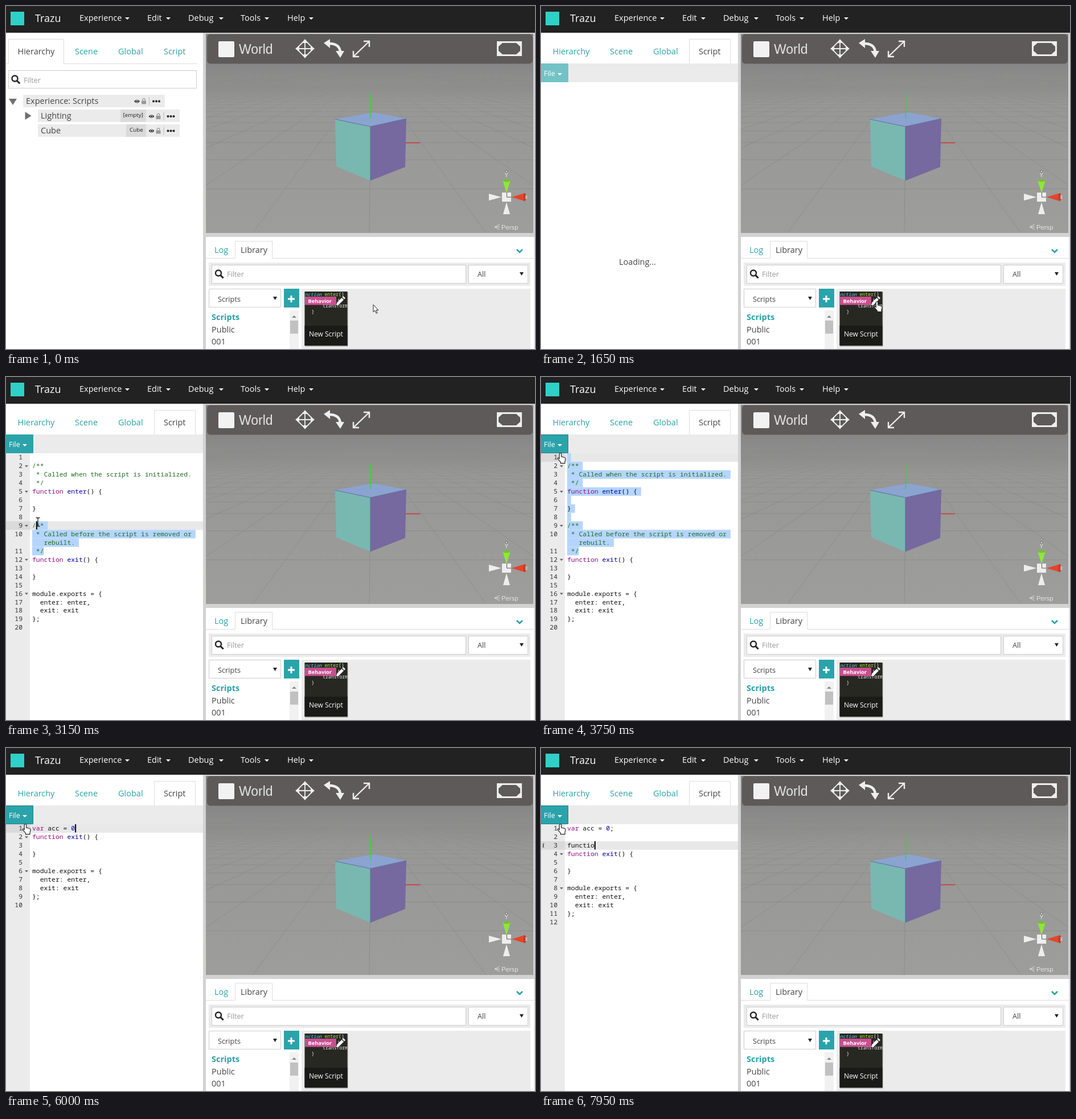
An HTML page that plays this animation: 929 px wide and 603 px high, repeating every 8000 ms.

```html
<!DOCTYPE html>
<html lang="en">
<head>
<meta charset="utf-8">
<title>Script editor</title>
<style>
  html, body { margin: 0; width: 100%; height: 100%; overflow: hidden; background: #fff; }
  svg { display: block; }
  text { font: 14.5px "Open Sans", sans-serif; fill: #444; white-space: pre; }
  .white { fill: #fff; }
  .link { fill: #2aa0a6; }
  .hint { font-size: 12.8px; fill: #999; }
  .small { font-size: 9.8px; fill: #222; }
  .unity { font-family: "Liberation Sans", Arial, sans-serif; fill: #e4e4e4; }
  .box { fill: #fff; stroke: #ccc; }
  .line { fill: none; stroke: #ddd; }
  .code text { font: 11.38px "Noto Sans Mono", monospace; fill: #111; }
  .code .num { text-anchor: end; fill: #333; }
  .code .info { font: italic bold 11px "Noto Serif", serif; fill: #555; }
  .code .loading { font: 14.4px "Open Sans", sans-serif; fill: #444; }
  .code .comment { fill: #236e24; }
  .thumb text { font: 8.2px "Noto Sans Mono", monospace; fill: #eee; }
  .thumb .badge { font: bold 9.3px "Open Sans", sans-serif; fill: #fff; }
  .thumb .name { font: 12px "Open Sans", sans-serif; fill: #fff; }
  .kw { fill: #930f80; }
  .fn { fill: #0000a2; }
  .lit { fill: #0000cd; }
</style>
</head>
<body>
<svg width="929" height="603" viewBox="0 0 929 603">
  <defs>
    <path id="drop" d="M0 0h8l-4 4z" fill="#fff"/>
    <path id="select" d="M0 0h7l-3.5 6z" fill="#222"/>
    <g id="lens" fill="none" stroke="#222" stroke-width="2.4"><circle r="5"/><path d="M3.7 3.7l5 5" stroke-width="3"/></g>
    <g id="tools">
      <path d="M-5 0Q0-6 5 0Q0 6-5 0z" fill="#222"/><circle r="2.4" fill="#eee"/><circle r="1.5" fill="#222"/>
      <path d="M8-1h8v6h-8z" fill="#999"/><path d="M9.8-1v-1.6a2.2 2.2 0 0 1 4.4 0v1.6" fill="none" stroke="#999" stroke-width="1.3"/>
      <path d="M21.5-7v14" stroke="#bbb"/>
      <g fill="#222"><circle cx="29" r="2"/><circle cx="34" r="2"/><circle cx="39" r="2"/></g>
    </g>
    <path id="arrow" d="M0 0v13l3-2.7 2.2 5 2-.9-2.2-4.8h4z" fill="#fff" stroke="#222"/>
    <path id="hand" d="M-1.8 1.5a1.7 1.7 0 0 1 3.5 0v4.6l6 1.4q1.7.6 1.4 2.8l-1.1 4v3.4h-7.5v-2l-5-5.7q-.8-2 1.2-2l1.5 1.4z" fill="#fff" stroke="#222" stroke-width="1.2"/>
    <path id="beam" d="M-3.5-7.5h2.5l1 1 1-1h2.5M0-6.5v13M-3.5 7.5h2.5l1-1 1 1h2.5" fill="none" stroke="#222" stroke-width="1.3"/>
    <linearGradient id="floor" x2="0" y2="1">
      <stop offset=".14" stop-color="#858585"/><stop offset=".35" stop-color="#979796"/><stop offset="1" stop-color="#9d9d9b"/>
    </linearGradient>
    <linearGradient id="fade" gradientUnits="userSpaceOnUse" x1="0" y1="118" x2="0" y2="230">
      <stop offset="0" stop-color="#777" stop-opacity="0"/><stop offset="1" stop-color="#777" stop-opacity=".4"/>
    </linearGradient>
    <clipPath id="view"><path d="M351 49h575v350H351z"/></clipPath>
    <clipPath id="card"><path d="M524.5 502h75v95h-75z"/></clipPath>
  </defs>

  <!-- menu bar -->
  <path d="M0 0h929v47H0z" fill="#222"/>
  <path d="M8 10h24v24H8z" fill="#2fd0c8"/>
  <text class="white" x="51" y="28" style="font-size:18px">Trazu</text>
  <g id="menu"></g>

  <!-- frame -->
  <path d="M346 47h583v359H346zM346 406h5v197h-5z" fill="#d2d2d2"/>

  <!-- viewport -->
  <g clip-path="url(#view)">
    <path d="M351 48h575v351H351z" fill="url(#floor)"/>
    <path id="grid" fill="none" stroke="url(#fade)"/>
    <rect x="353" y="49.5" width="572" height="52" rx="6" fill="#5e5a5a"/>
    <path d="M578 199l67-12 58 11-63 14z" fill="#8ba3d0"/>
    <path d="M578 199l62 13v95l-60-25z" fill="#79b8b0"/>
    <path d="M703 198l-63 14v95l61-24z" fill="#75699f"/>
    <path d="M578 199l62 13 63-14M640 212v95" fill="none" stroke="#66709f" stroke-width="1.2"/>
    <path d="M640.5 153v44" stroke="#35d535" stroke-width="1.6"/>
    <path d="M702 240.5h25" stroke="#c83a3a" stroke-width="1.6"/>
  </g>
  <rect x="373" y="62" width="28" height="28" rx="2" fill="#f2f2f2"/>
  <text class="unity" x="409" y="84" style="font-size:23px">World</text>
  <g fill="none" stroke="#eee" stroke-width="1.8">
    <path d="M525 60l15 15-15 15-15-15zM525 62v26M512 75h26"/>
    <path d="M567 66q19 0 20 15" stroke-width="4.5"/>
    <path d="M611 88l26-25M610 79v10h10M628 62h10v10" stroke-width="2.4"/>
    <path d="M863.5 63.5h41v23h-41z" stroke-width="3"/>
  </g>
  <path d="M525 58l5 7h-10zM525 92l5-7h-10zM508 75l7-5v10zM542 75l-7-5v10zM558 65l11-7v16zM579 79h15l-7 12zM864 64h9l-9 8zM904 64h-9l9 8zM864 86h9l-9-8zM904 86h-9l9-8z" fill="#eee"/>

  <!-- axis gizmo -->
  <path d="M848 330v12l22-6zM873 366h12l-6-21zM871 328h16v16h-16z" fill="#eee"/>
  <path d="M872 306h14l-7 23z" fill="#8fe63a"/><ellipse cx="879" cy="307" rx="7" ry="2" fill="#6fc52a"/>
  <path d="M888 336l23-7v14z" fill="#e8432a"/><ellipse cx="911" cy="336" rx="2" ry="7" fill="#b93624"/>
  <path d="M879.5 328v8h8" fill="none" stroke="#555"/>
  <circle cx="879" cy="291" r="2" fill="#ddd" stroke="#666"/>
  <text class="unity" x="875.5" y="301" style="font-size:10px">Y</text>
  <text class="unity" x="911" y="339" style="font-size:10px">x</text>
  <path d="M867 384l-9 4.5 9 4.5M858 388.5h9" fill="none" stroke="#ddd"/>
  <text class="unity" x="870" y="393" style="font-size:11.3px">Persp</text>

  <!-- library -->
  <path d="M351 406h576v197H351z" fill="#fff"/>
  <path d="M927 406h2v197h-2z" fill="#e6e6e6"/>
  <path class="line" d="M351 443.5h51.5v-30h65v30H927"/>
  <text class="link" x="366" y="434">Log</text>
  <text x="412" y="434">Library</text>
  <path d="M897 428l5 5 5-5" fill="none" stroke="#2aa0a6" stroke-width="2.6"/>
  <path d="M356 451h565v41H356zM519 497h402v106H519z" fill="#ebebeb"/>
  <path class="box" d="M361.5 455.5h446v32h-446zM812.5 455.5h104v32h-104zM356.5 497.5h126v32h-126z"/>
  <use href="#lens" x="373" y="469.5"/>
  <text class="hint" x="388" y="476">Filter</text>
  <text class="hint" x="828" y="476" style="fill:#444">All</text>
  <text class="hint" x="372" y="520" style="fill:#444">Scripts</text>
  <use href="#select" x="902" y="468"/><use href="#select" x="469" y="511"/>
  <path d="M488 497h27v33h-27z" fill="#2ba3ab"/>
  <path d="M495 515h12M501 509v12" stroke="#fff" stroke-width="3"/>
  <text class="link" x="361" y="552" style="font-weight:bold">Scripts</text>
  <text x="361" y="574">Public</text>
  <text x="361" y="595">001</text>
  <path d="M498 535h16v68h-16z" fill="#f1f1f1"/>
  <path d="M499 553h14v23h-14z" fill="#c1c1c1"/><path d="M502 548h8l-4-4z" fill="#888"/>
  <path d="M525 503h75.5v95.5H525z" fill="#999"/>
  <g class="thumb" clip-path="url(#card)">
    <path d="M524 502h76v95h-76z" fill="#272822"/>
    <text x="525" y="510"><tspan font-style="italic" fill="#66d9ef">nction</tspan> <tspan fill="#a6e22e">enter</tspan>()</text>
    <text x="582" y="521">i</text>
    <text x="556" y="530">transform</text>
    <text x="536.5" y="541">}</text>
    <path d="M525 511h55v14.5h-55z" fill="#c94f90"/>
    <text class="badge" x="530.5" y="522">Behavior</text>
    <path d="M524 562h76v35h-76z" fill="#1a1b17"/>
    <text class="name" x="532" y="581">New Script</text>
    <path d="M580 526l1.5-5 8-8 3.5 3.5-8 8zM590.5 512l2-2 3.5 3.5-2 2z" fill="#fff"/>
  </g>

  <!-- left panel -->
  <text class="link" x="121" y="85">Scene</text>
  <text class="link" x="197" y="85">Global</text>
  <g id="tree">
    <path class="line" d="M0 101.5h4.5v-43h97v43H335"/>
    <text x="20.5" y="85">Hierarchy</text>
    <text class="link" x="277" y="85">Script</text>
    <path class="box" d="M4.5 113.5h330v31H4.5z"/>
    <use href="#lens" x="15.5" y="127.5"/>
    <text class="hint" x="31" y="135">Filter</text>
    <path d="M30 156h249v22H30zM56 182h249v22H56zM56 208h249v22H56z" fill="#ebebeb"/>
    <path d="M201 182h45v22h-45zM211 208h35v22h-35z" fill="#dadada"/>
    <path d="M5 163h14l-7 11zM33.5 186v14l11-7z" fill="#707070"/>
    <text x="35" y="172">Experience: Scripts</text>
    <text x="61" y="198">Lighting</text>
    <text x="61" y="223.5">Cube</text>
    <text class="small" x="205.5" y="195">[empty]</text>
    <text class="small" x="217" y="221">Cube</text>
    <use href="#tools" x="230" y="167.5"/><use href="#tools" x="255.5" y="194"/><use href="#tools" x="255.5" y="219.5"/>
  </g>
  <g id="editor">
    <path class="line" d="M260.5 101.5v-43h72v43"/>
    <text class="link" x="20.5" y="85">Hierarchy</text>
    <text x="277" y="85">Script</text>
    <path d="M0 101h346v33H0z" fill="#ebebeb"/>
    <path id="file" d="M-.5 101.5h48v32h-48z"/>
    <text class="white" x="5" y="123" style="font-size:12.5px">File</text>
    <use href="#drop" x="29" y="118"/>
    <g id="code" class="code"></g>
  </g>
  <use id="cursor"/>
</svg>
<script>
const $ = id => document.getElementById(id);
const LOOP = 8000, TOP = 134, LEFT = 46, ROW = 14.96, CHAR = 6.83;

const INTRO = `
/**
 * Called when the script is initialized.
 */
function enter() {

}

/**
 * Called before the script is removed or
   rebuilt.
 */`;
const REST = `
function exit() {

}

module.exports = {
  enter: enter,
  exit: exit
};
`;

// Each step holds until the next one: [time, ...values]
const pointer = [
  [0, 'arrow', 645, 525], [600, 'arrow', 634, 526], [750, 'arrow', 613, 527], [900, 'arrow', 597, 524],
  [1050, 'hand', 590, 520], [2100, 'arrow', 535, 500], [2250, 'arrow', 400, 432], [2400, 'beam', 240, 355],
  [2550, 'beam', 153, 318], [2700, 'beam', 100, 309], [2850, 'beam', 70, 307], [3000, 'beam', 66, 306],
  [3150, 'beam', 56, 255], [3300, 'beam', 46, 186], [3450, 'hand', 34, 134]
];
const carets = [[0, 0, 0], [3000, 11, 3], [3150, 8, 1], [3300, 3, 0], [3450, 0, 0]];
const typing = [
  [4050, ''], [4350, 'v'], [4500, 'var'], [4950, 'var a'], [5250, 'var ac'], [5400, 'var acc'],
  [5550, 'var acc ='], [5700, 'var acc = '], [6000, 'var acc = 0'], [6300, 'var acc = 0;'],
  [6450, 'var acc = 0;\n'], [7050, 'var acc = 0;\n\n'], [7350, 'var acc = 0;\n\nf'],
  [7500, 'var acc = 0;\n\nfu'], [7650, 'var acc = 0;\n\nfunc'], [7800, 'var acc = 0;\n\nfunct'],
  [7950, 'var acc = 0;\n\nfunctio']
];
// Gutter marks: [from, to, kind, row]
const marks = [[4500, 4950, 'info', 0], [4950, 5700, 'error', 1], [6300, 6450, 'info', 0], [7650, LOOP, 'info', 2]];

const at = (steps, t) => steps.findLast(step => step[0] <= t);
const rowY = row => TOP + row * ROW;
const rect = (x, y, w, h, fill) => `<rect x="${x}" y="${y}" width="${w}" height="${h}" fill="${fill}"/>`;

function highlight(line) {
  if (/^(\/\*| \*|   r)/.test(line)) return `<tspan class="comment">${line}</tspan>`;
  return line.replace(/\b(\d+|function|var|enter(?=\()|exit(?=\())\b/g, word => {
    const kind = /\d/.test(word) ? 'lit' : /^e/.test(word) ? 'fn' : 'kw';
    return `<tspan class="${kind}">${word}</tspan>`;
  });
}

function drawMark([, , kind, row]) {
  const y = rowY(row);
  if (kind === 'info') return `<text class="info" x="2" y="${y + 11.5}">i</text>`;
  return `<rect x="-1" y="${y + 1.5}" width="12" height="11.5" rx="2" fill="#c9523f"/>` +
    `<path d="M2 ${y + 4}l6.5 6.5m0-6.5l-6.5 6.5" stroke="#fff" stroke-width="1.8"/>`;
}

function drawCode(t) {
  const typed = at(typing, t)?.[1];
  const editing = typed !== undefined;
  const lines = ((editing ? typed : INTRO) + REST).split('\n');
  let [, row, col] = at(carets, t);
  if (editing) {
    const before = typed.split('\n');
    row = before.length - 1;
    col = before[row].length;
  }

  let out = rect(0, TOP, 42, 469, '#ebebeb') + rect(0, rowY(row), 42, ROW, '#dadada') +
    rect(42, rowY(row), 304, ROW, '#e8e8e8');
  if (t >= 3150 && !editing) {
    for (let r = row; r <= 11; r++) {
      const from = r === row ? col : 0;
      const to = r === 11 ? 3 : lines[r].length + 1;
      out += rect(LEFT + from * CHAR, rowY(r), (to - from) * CHAR, ROW, '#b5d5ff');
    }
  }

  let number = 0;
  lines.forEach((line, r) => {
    const y = rowY(r) + 11.2;
    out += `<text x="${LEFT}" y="${y}">${highlight(line)}</text>`;
    if (!line.startsWith('   r')) out += `<text class="num" x="29" y="${y}">${++number}</text>`;
    if (/^\/\*\*|\{$/.test(line)) out += `<path d="M33 ${y - 5}h6l-3 3.5z" fill="#666"/>`;
  });

  out += marks.filter(([from, to]) => from <= t && t < to).map(drawMark).join('');
  const focused = t >= 3000;
  if (t < 3750 || editing)
    out += rect(LEFT + col * CHAR, rowY(row), focused ? 2 : 1, ROW - .5, focused ? '#000' : '#999');
  return out;
}

function draw(t) {
  const loading = t < 1800;
  $('tree').style.display = t < 1500 ? '' : 'none';
  $('editor').style.display = t < 1500 ? 'none' : '';
  $('file').setAttribute('fill', loading ? '#73c2c6' : '#2ba3ab');
  $('file').setAttribute('stroke', loading ? '#73c2c6' : t < 3450 ? '#2ba3ab' : '#1f7f86');
  $('code').innerHTML = loading ? '<text class="loading" x="137" y="455">Loading...</text>' : drawCode(t);
  const [, shape, x, y] = at(pointer, t);
  $('cursor').setAttribute('href', '#' + shape);
  $('cursor').setAttribute('transform', `translate(${x} ${y})`);
}

$('menu').innerHTML = [['Experience', 129, 209], ['Edit', 248, 281], ['Debug', 320, 374], ['Tools', 412, 454], ['Help', 494, 532]]
  .map(([name, x, drop]) => `<text class="white" x="${x}" y="26">${name}</text><use href="#drop" x="${drop}" y="20"/>`).join('');

let grid = '';
for (let n = 3; n < 30; n++) grid += `M351 ${118 + 610 / n}h575`;
for (let k = -30; k <= 30; k++) grid += `M641 118l${k * 205 - 3} 281`;
$('grid').setAttribute('d', grid);

let shown = -1;
(function tick() {
  const step = Math.floor(performance.now() % LOOP / 50);
  if (step !== shown) draw((shown = step) * 50);
  requestAnimationFrame(tick);
})();
</script>
</body>
</html>
```
